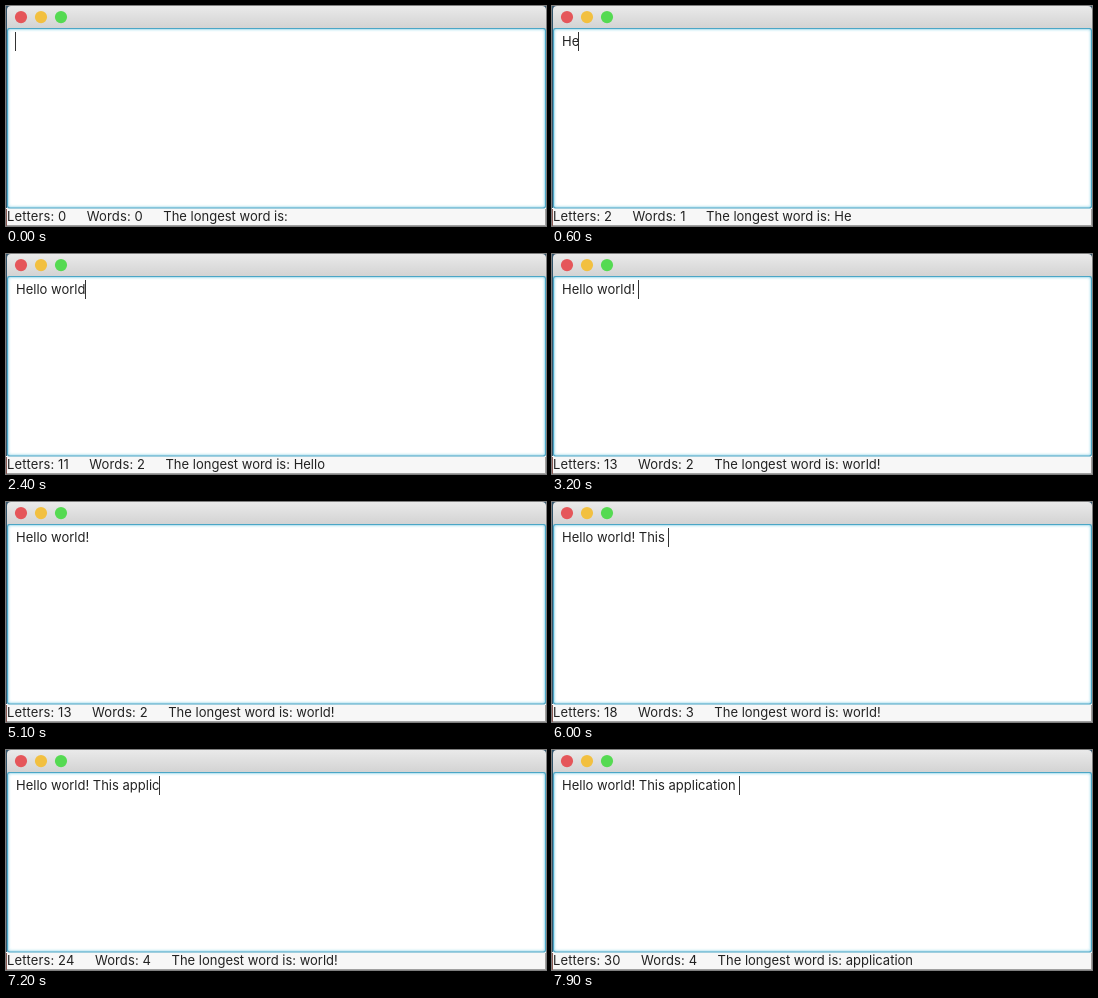
Recreate the animation shown at these times as an HTML page with a canvas. Size 540x220 px, loop 8000 ms.

```html
<!DOCTYPE html>
<html lang="en">
<head>
<meta charset="utf-8">
<title>Word counter</title>
<style>
  html, body { margin: 0; width: 100%; height: 100%; overflow: hidden; background: #f7f7f7; }
  body { position: relative; font: 13px/18px Inter, "Open Sans", sans-serif; color: #222; }
  canvas { position: absolute; left: 0; top: 0; }
  .row { position: absolute; white-space: pre; display: flex; }
  #editor { left: 10px; top: 26px; }
  #caret { width: 1px; height: 19px; margin-left: -0.8px; background: #333; }
  #status { left: 1px; top: 201px; gap: 20.4px; }
  .count { letter-spacing: 0.12px; }
</style>
</head>
<body>
<canvas id="stage" width="540" height="220"></canvas>
<div id="editor" class="row"><span id="typed"></span><i id="caret"></i></div>
<div id="status" class="row"><span id="letters" class="count"></span><span id="words" class="count"></span><span id="longest"></span></div>
<script>
const LOOP = 8000, BLINK = 500;
const TEXT = "Hello world! This application ";
// One key press per character, in ms
const KEYS = [
  200, 500, 700, 900, 1000, 1300,
  1900, 2000, 2200, 2300, 2400, 2700, 3200,
  5200, 5300, 5500, 5700, 5900,
  6400, 6500, 6600, 6900, 7000, 7200, 7300, 7400, 7600, 7700, 7800, 7900
];
const $ = id => document.getElementById(id);
const ctx = $("stage").getContext("2d");

function rect(color, x, y, w, h) {
  ctx.fillStyle = color;
  ctx.fillRect(x, y, w, h);
}

function roundBox(color, x, y, w, h, r) {
  ctx.beginPath();
  ctx.roundRect(x, y, w, h, r);
  ctx.fillStyle = color;
  ctx.fill();
}

function dot(color, x) {
  roundBox(color, x - 6.1, 5, 12.2, 12.2, 6.1);
}

function drawWindow() {
  rect("#f7f7f7", 0, 0, 540, 220);
  rect("#34556b", 0, 0, 1, 202);
  rect("#8a5a55", 0, 203, 1, 17);
  rect("#a0a0a0", 539, 203, 1, 17);
  rect("#a0a0a0", 1, 219, 539, 1);

  const bar = ctx.createLinearGradient(0, 0, 0, 22);
  bar.addColorStop(0, "#eaeaea");
  bar.addColorStop(1, "#d3d3d3");
  rect("#34556b", 0, 0, 540, 5);
  roundBox(bar, 1, 0, 539, 23, [4, 4, 0, 0]);
  dot("#e5565a", 15);
  dot("#f2c040", 35);
  dot("#55da52", 55);

  // Focus ring fading inwards
  ["#4ba6c6", "#bfe6f2", "#e6f6fa", "#f8fdfe", "#ffffff"].forEach((color, i) =>
    roundBox(color, 1 + i, 22 + i, 539 - 2 * i, 180.5 - 2 * i, 2));
}

function setText(id, value) {
  if ($(id).textContent !== value) $(id).textContent = value;
}

function render(t) {
  const count = KEYS.filter(k => k <= t).length;
  const typed = TEXT.slice(0, count);
  const words = typed.split(" ").filter(Boolean);
  const longest = words.reduce((a, b) => b.length > a.length ? b : a, "");
  const idle = t - (count ? KEYS[count - 1] : 0);

  setText("typed", typed);
  setText("letters", "Letters: " + count);
  setText("words", "Words: " + words.length);
  setText("longest", "The longest word is: " + longest);
  $("caret").style.opacity = Math.floor(idle / BLINK) % 2 ? 0 : 1;
}

function tick(now) {
  render(now % LOOP);
  requestAnimationFrame(tick);
}

drawWindow();
render(0);
requestAnimationFrame(tick);
</script>
</body>
</html>
```
